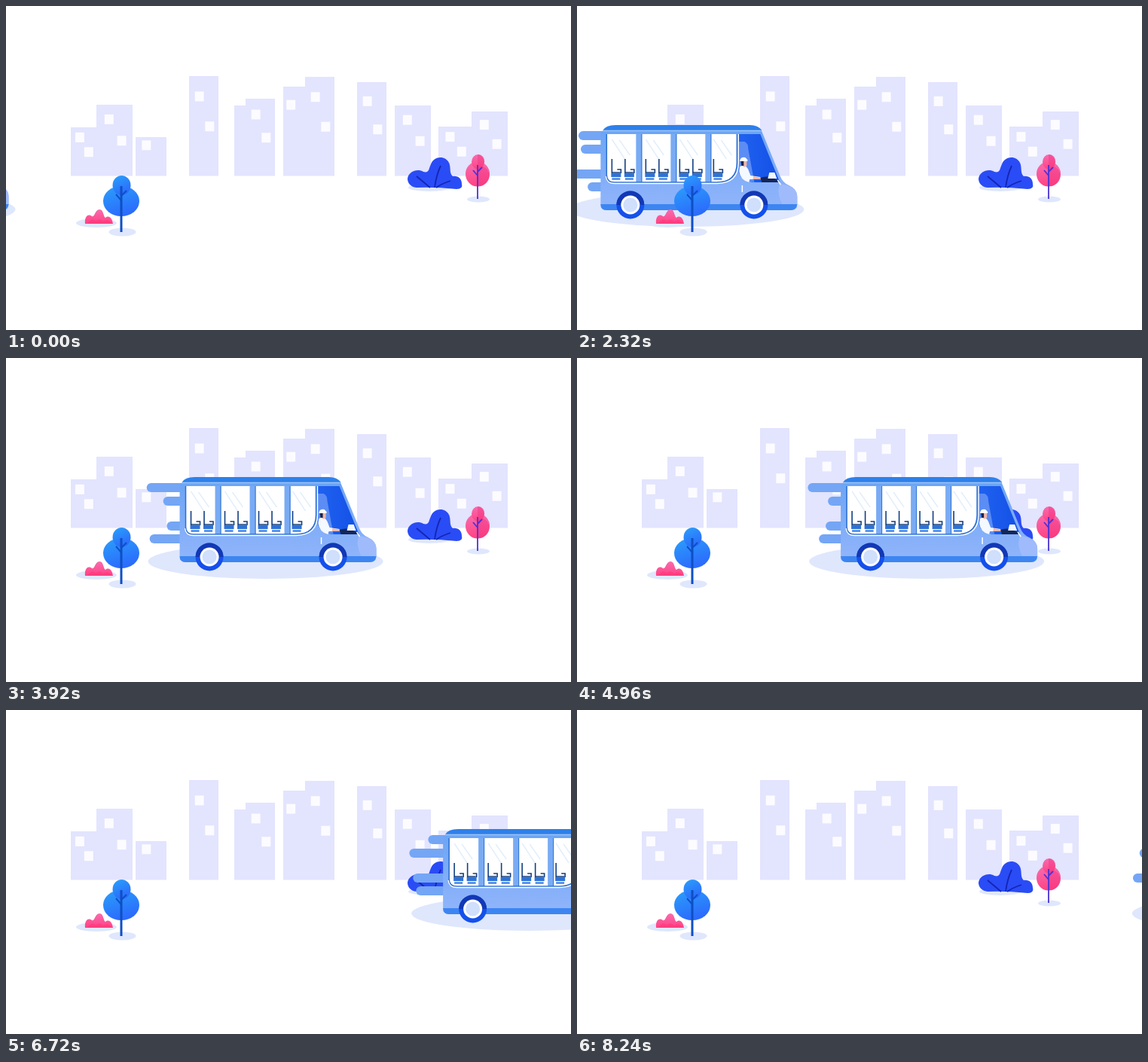
An HTML page that plays this animation: 750 by 430 pixels, repeating every 8280 ms.

```html
<!DOCTYPE html>
<html lang="en">
<head>
<meta charset="utf-8">
<title>Bus in the city</title>
<style>
  html, body { margin: 0; width: 100%; height: 100%; overflow: hidden; background: #fff; }
  svg { display: block; width: 750px; height: 430px; }
  .shade { fill: #dfe7fd; }
</style>
</head>
<body>
<svg viewBox="0 0 750 430">
  <defs>
    <linearGradient id="leaf" x2=".4" y2="1">
      <stop stop-color="#2ba0fa"/><stop offset="1" stop-color="#2b6cfc"/>
    </linearGradient>
    <linearGradient id="pink" x2="0" y2="1">
      <stop stop-color="#f76cb0"/><stop offset="1" stop-color="#ff4384"/>
    </linearGradient>
    <linearGradient id="paint" x2="0" y2="1">
      <stop stop-color="#6ba5f4"/><stop offset="1" stop-color="#92b5fb"/>
    </linearGradient>
    <linearGradient id="glass">
      <stop stop-color="#2062f0"/><stop offset="1" stop-color="#1350e6"/>
    </linearGradient>
    <clipPath id="pane">
      <path d="M8 170H181V208Q181 234 154 234H18Q8 234 8 224Z"/>
    </clipPath>
    <g id="wheel">
      <circle r="18.5" fill="#1450ec"/>
      <path d="M-18.500 0A18.500 18.500 0 0 1 18.500 0Z" fill="#1238b4"/>
      <circle r="12.500" fill="#fff"/>
      <circle r="9.500" fill="#cfdffc"/>
    </g>
    <g id="seat" fill="none" stroke="#123f82" stroke-width="1.6">
      <path d="M1 203V222M1 215V221H12M8 217H13V222"/>
      <path d="M0 222H13V227H0Z" fill="#2f72d4" stroke="none"/>
      <path d="M1 228H12V231H1Z" fill="#5a96ea" stroke="none"/>
    </g>
  </defs>

  <g id="city" fill="#e3e4fe"></g>

  <g id="rightPlants">
    <ellipse class="shade" cx="562" cy="241" rx="28" ry="5"/>
    <path d="M545 241C536 240 533 234 533 229C534 220 546 215 554 220C562 222 561 216 564 210C568 199 583 198 588 208C591 214 588 222 593 226C600 225 605 229 605 236Q607 243 598 243Q570 240 545 241Z" fill="#2a4cf6"/>
    <path d="M545 226L563 241M577 212Q571 225 569 241M590 232Q578 236 571 241" fill="none" stroke="#1425b4" stroke-width="1.8"/>
    <ellipse class="shade" cx="627" cy="256.500" rx="15" ry="4"/>
    <g fill="url(#pink)">
      <ellipse cx="626" cy="223" rx="16" ry="16.500"/>
      <ellipse cx="626.500" cy="207" rx="8.500" ry="10"/>
    </g>
    <path d="M626 197C636 197 637 207 633 213C646 218 645 239 626 239Z" fill="#f0307c" opacity=".4"/>
    <path d="M626 211V256M620 218L626 225M632 214L626 220" stroke="#4b32d6" stroke-width="1.8" fill="none"/>
  </g>

  <g id="bus">
    <ellipse class="shade" cx="114" cy="270" rx="156" ry="23"/>
    <g id="trails" fill="#74a6f5"></g>
    <path d="M0 172Q0 164 10 164H213L238 225Q242 235 250 238Q261 243 261 253V263Q261 271 253 271H8Q0 271 0 263Z" fill="url(#paint)"/>
    <path d="M238 236Q261 239 261 253V263H241Q233 247 238 236Z" fill="#a0bbfb"/>
    <path d="M0 263H261Q260 271 252 271H8Q0 271 0 263Z" fill="#3c86f2"/>
    <path d="M3 165Q7 158 20 158H198Q209 158 214 165Z" fill="#2e80ea"/>
    <path d="M3 165.500H213" stroke="#9cc4f8" stroke-width="1.5"/>
    <path d="M183 170H212L238 234H202Q184 231 183 218Z" fill="url(#glass)"/>
    <path d="M183 180H191Q196 182 196 190L204 234Q184 231 183 218Z" fill="#5c8df4"/>

    <g id="driver">
      <path d="M185 213Q192 209 196 217L199 225L212 227V230H198L197 234Q185 231 184 219Z" fill="#f4f8ff"/>
      <path d="M187 206H194V212Q191 215 188 212Z" fill="#f2b7a6"/>
      <path d="M186 205H190V212H187Z" fill="#182348"/>
      <path d="M185 205Q186 200 192 201L195 204V206H185Z" fill="#fff"/>
      <path d="M203 226L213 228V230H202Z" fill="#f2b7a6"/>
    </g>
    <path d="M212 228Q225 223 238 234H214Z" fill="#13265c"/>
    <path d="M224 221H231L234 229H222Z" fill="#f2f6ff"/>
    <path d="M235 231L239 237M188 238V247" stroke="#fff" stroke-width="1.5"/>

    <g clip-path="url(#pane)">
      <path d="M8 170H181V234H8Z" fill="#fff"/>
      <g id="cabin"></g>
    </g>
    <path d="M8 170V224Q8 234 18 234H154Q181 234 181 208V170" fill="none" stroke="#2a6ed0" stroke-width="1.5"/>
    <path d="M7 226Q8 235.500 18 235.500H155Q183 235 183 208V170" fill="none" stroke="#fff" stroke-width="1.3"/>
    <use href="#wheel" x="39.500" y="264"/>
    <use href="#wheel" x="203.500" y="264"/>
  </g>

  <g id="leftPlants">
    <ellipse class="shade" cx="120" cy="288" rx="27" ry="6"/>
    <path d="M105 289C104 279 109 275 114 279C118 281 118 270 124 270C130 270 129 280 132 281C137 277 141 282 142 289Z" fill="url(#pink)"/>
    <path d="M108 289Q113 280 119 285Q125 281 129 286Q135 281 141 289Z" fill="#ff3478" opacity=".5"/>
    <ellipse class="shade" cx="154.500" cy="300" rx="18" ry="5.500"/>
    <g fill="url(#leaf)">
      <ellipse cx="153" cy="259" rx="24" ry="20"/>
      <ellipse cx="153.500" cy="238" rx="12" ry="13"/>
    </g>
    <path d="M153 239V300" stroke="#0e4fc5" stroke-width="3"/>
    <path d="M146 250L153 258M160 245L153 252" stroke="#0e4fc5" stroke-width="2"/>
  </g>
</svg>
<script>
const $ = id => document.getElementById(id);
const rect = (x, y, w, h, extra = '') =>
  `<rect x="${x}" y="${y}" width="${w}" height="${h}" ${extra}/>`;
const repeat = (n, make) => Array.from({ length: n }, (_, i) => make(i)).join('');

// Skyline blocks: left, right, top
const GROUND = 225.5;
const blocks = [
  [86, 120, 161], [120, 168, 131], [172, 213, 174], [243, 282, 93],
  [303, 318, 132], [318, 357, 123], [368, 397, 107], [397, 436, 94],
  [466, 505, 101], [516, 564, 132], [574, 618, 160], [618, 666, 140]
];

// Windows step down each block, left then right
function block([left, right, top]) {
  const w = right - left, h = GROUND - top;
  const count = w < 20 ? 0 : w < 30 || h < 60 ? 1 : 2;
  return rect(left, top, w, h) + repeat(count, i =>
    rect(left + w * (i ? 0.7 : 0.35) - 6, top + h * (0.2 + 0.3 * i) - 6, 12, 13, 'fill="#fcfbff"'));
}
$('city').innerHTML = blocks.map(block).join('');

$('cabin').innerHTML = repeat(4, i => {
  const x = 14 + 45 * i;
  return `<path d="M${x + 1} 177l17 26m-7-25l14 20" stroke="#e2effc" stroke-width="1.5"/>
    <use href="#seat" x="${x}"/>` + (i < 3 ? `<use href="#seat" x="${x + 17.5}"/>` +
    rect(47 + 46 * i, 170, 8, 64, 'fill="#79abf4"') +
    rect(54 + 46 * i, 170, 1, 64, 'fill="#2f74cf"') : '');
});

// Speed trails pulse behind the bus, each with its own phase
const phases = [0.3, 3.9, 3.2, 5.3];
$('trails').innerHTML = [166, 184, 217, 234].map(y => rect(0, y, 0, 12, 'rx="6"')).join('');
const bars = [...$('trails').children];

const LOOP = 8280, STEP = 80, DEPART = 4240, STOP = 256;
const start = performance.now();

// Drive in, rest briefly in mid-stage, then leave a little faster
const busX = t => t < DEPART
  ? Math.min(STOP, -257.5 + 0.1245 * t)
  : STOP + 0.1307 * (t - DEPART);

function draw() {
  const t = Math.floor((performance.now() - start) % LOOP / STEP) * STEP;
  $('bus').setAttribute('transform', `translate(${busX(t)})`);
  bars.forEach((bar, i) => {
    const reach = 31 + 14 * Math.sin(2 * Math.PI * t / 1200 + phases[i]);
    bar.setAttribute('x', -reach);
    bar.setAttribute('width', reach + 8);
  });
  requestAnimationFrame(draw);
}
draw();
</script>
</body>
</html>
```
